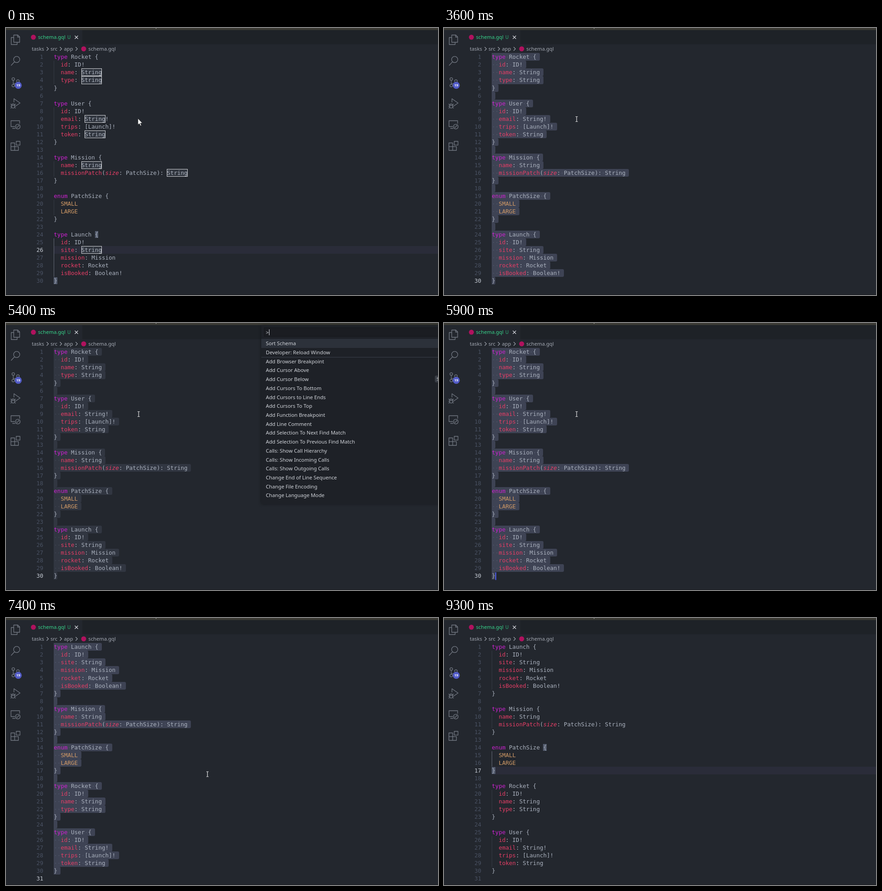
Animation of 951 by 589 pixels, one loop 9500 ms. Source, as an HTML page:

```html
<!DOCTYPE html>
<html lang="en">
<head>
<meta charset="utf-8">
<title>Sort schema</title>
<style>
  :root { --lh: 17.04px; --cw: 7.553px; --top: 55.4px; --left: 105.3px; }
  html, body { margin: 0; width: 100%; height: 100%; overflow: hidden; background: #23272e; }
  #stage { position: relative; width: 951px; height: 589px; overflow: hidden; background: #23272e; }
  #stage > svg { position: absolute; left: 0; top: 0; }
  svg text { font: 11.2px "Noto Sans", sans-serif; }
  .icons { fill: none; stroke: #737983; stroke-width: 1.3; stroke-linejoin: round; }
  .crumbs { fill: #a3a8b2; }
  .marks { fill: none; stroke: #a3a8b2; stroke-width: 1.1; }

  .doc { position: absolute; z-index: 0; left: var(--left); top: var(--top); width: 846px;
    font: 12.546px/var(--lh) "DejaVu Sans Mono", monospace; font-variant-ligatures: none;
    color: #abb2bf; white-space: pre; }
  .l { position: relative; height: var(--lh); }
  .n { position: absolute; left: -60px; width: 36.7px; text-align: right; color: #495162; }
  .l.on .n { color: #c3c8d1; }
  .l.on::before { content: ""; position: absolute; z-index: -2; inset: 0; background: #2a2c39; }
  .l.in::after { content: ""; position: absolute; z-index: -1; left: 0; top: 0; width: 1px;
    height: 100%; background: #363b45; }
  .blk.on .l.in::after { background: #646a76; }
  .t, .w { display: inline-block; height: var(--lh); vertical-align: top; }
  .t { padding-right: var(--cw); border-radius: 0 3px 3px 0; }
  .t.last { padding: 0; }
  .k { color: #cc22d0; }
  .f { color: #e63e66; }
  .c { color: #d19a66; }
  .s { color: transparent; }
  .blk.on .b { background: #50586a; box-shadow: inset 0 0 0 1px #5a6376; }
  .words .w { background: #31363f; box-shadow: inset 0 0 0 1px #d4d6da; }
  .sel .t { background: #3e4354; }
  .sel .s { color: #50566a; }
  .sel .l.on::before { display: none; }
  .dim .t { background: #313641; }
  .dim .s { color: #414753; }
  #caret { position: absolute; width: 2px; height: var(--lh); background: #4858ee; }

  #palette { position: absolute; left: 562px; top: 5px; width: 420px; height: 394px;
    background: #1e2127; box-shadow: 0 0 7px rgba(0,0,0,.4);
    font: 11.24px/19.72px "Noto Sans", sans-serif; color: #d2d5db; }
  #palette .input { position: absolute; left: 6px; top: 5px; right: 0; height: 20px;
    box-sizing: border-box; border: 1px solid #15171b; background: #1b1d22; padding-left: 3px; }
  #bar { position: absolute; left: 10px; top: 3px; width: 1px; height: 13px; background: #dfe2e8; }
  #palette .rows { position: absolute; top: 30.2px; left: 0; right: 0; }
  #palette .rows div { height: 19.72px; padding-left: 10px; white-space: nowrap; }
  #palette .rows div:first-child { background: #2c313a; }
  #palette .rows div:nth-child(3) { box-shadow: inset 0 1px #3b404a; }
  #palette .key { position: absolute; left: 382px; top: 111px; width: 30px; height: 15px; padding-left: 4px;
    background: #393d45; border-radius: 3px; font-size: 9.5px; line-height: 15px; }
</style>
</head>
<body>
<div id="stage">
  <svg width="951" height="589">
    <path fill="#1e2227" d="M168 4H951V36H168z"/>
    <path fill="#3b3b35" d="M0 0H951V4.5H0z"/>
    <path fill="#c8c8c0" d="M330 0h1.5l-1 1.5h-1z"/>
    <path fill="#191c20" d="M0 588H951V589H0z"/>

    <g class="icons">
      <path d="M17 15.5h9l4 4V31.500H17zM25.500 15.500V20H30M17 21H11.500V36.500H24.500V31.500"/>
      <path d="M18.800 74.500L11.200 82.800"/><circle cx="23.500" cy="69.500" r="6.800"/>
      <circle cx="16" cy="112.500" r="2.900"/><circle cx="16" cy="127" r="2.900"/><circle cx="26.300" cy="117" r="2.900"/>
      <path d="M16 115.500V124M26.300 120C26 123.500 19 121 16.500 124"/>
      <path d="M17.500 164V156L31 165.500L21.500 172"/>
      <path d="M12.500 170.500a3.200 3.200 0 0 1 6.400 0v3a3.200 3.200 0 0 1-6.400 0zM12.500 170.500h6.400M10 167.500l2.500 2M21.400 167.500l-2.500 2M9.800 172.500h2.700M18.900 172.500h2.700M10 177l2.700-2M21.400 177l-2.700-2"/>
      <path d="M19.500 217.500H11V204.500H30V211M14 221.500h6.500"/>
      <circle cx="26" cy="217.500" r="5.200"/><path d="M23.500 217l1.800 1.700-1.800 1.700M28.600 214.500l-1.800 1.700 1.800 1.700"/>
      <path d="M10.800 253.500h8.300V270H10.800zM10.800 261.700H27.400V270H19.100V261.700M22.500 250h8.300v8.300h-8.300z"/>
    </g>
    <circle cx="27" cy="126.500" r="7.700" fill="#525bc6"/>
    <text x="27" y="129.300" text-anchor="middle" fill="#fff" style="font-size:7.500px;font-weight:700">19</text>

    <circle cx="60.300" cy="20.300" r="5.500" fill="#b0125e"/>
    <text x="70.500" y="24.200" fill="#38d48b">schema.gql</text>
    <text x="135" y="24.200" fill="#2fb578" style="font-size:10px">U</text>
    <path d="M151.500 17l7 7M158.500 17l-7 7" stroke="#d7dae0" stroke-width="1.200"/>

    <g class="crumbs">
      <text x="56.800" y="50">tasks</text><text x="98" y="50">src</text>
      <text x="127.500" y="50">app</text><text x="181.300" y="50">schema.gql</text>
    </g>
    <path class="marks" d="M89.500 42l4 4-4 4M118.700 42l4 4-4 4M153.300 42l4 4-4 4"/>
    <circle cx="171" cy="46" r="5.500" fill="#b0125e"/>
  </svg>

  <div id="caret"></div>

  <div id="palette">
    <div class="input">&gt;<i id="bar"></i></div>
    <div class="rows"></div>
    <div class="key">Shift</div>
  </div>

  <svg width="951" height="589">
    <g id="mouse">
      <path id="arrow" d="M0 0V14.500l3.300-3 2.300 5.200 2.300-1-2.300-5h4.500z" fill="#f4f4f4" stroke="#15171a" stroke-width=".8"/>
      <path id="beam" d="M-2.500-5.500H-.7L0-5l.7-.5H2.500M0-5V5M-2.500 5.500H-.7L0 5l.7.5H2.500" fill="none" stroke="#e6e6e6" stroke-width="1.200"/>
    </g>
  </svg>
</div>

<script>
const LOOP = 9500, LH = 17.04, CW = 7.553, TOP = 55.4, LEFT = 105.3;
const $ = id => document.getElementById(id);
const stage = $('stage');

const blocks = [
  'type Rocket {|  id: ID!|  name: String|  type: String|}',
  'type User {|  id: ID!|  email: String!|  trips: [Launch]!|  token: String|}',
  'type Mission {|  name: String|  missionPatch(size: PatchSize): String|}',
  'enum PatchSize {|  SMALL|  LARGE|}',
  'type Launch {|  id: ID!|  site: String|  mission: Mission|  rocket: Rocket|  isBooked: Boolean!|}'
].map(b => b.split('|'));
const nameOf = block => block[0].split(' ')[1];
const sorted = [...blocks].sort((a, b) => nameOf(a) < nameOf(b) ? -1 : 1);

function paint(line) {
  const tag = (cls, s) => `<span@class="${cls}">${s}</span>`;
  return line
    .replace(/^(type|enum)|^( +)([A-Z]+)$|^( +)(\w+)/, (m, key, p1, value, p2, field) =>
      key ? tag('k', key) : value ? p1 + tag('c', value) : p2 + tag('f', field))
    .replace('(size', '(<i@class="f">size</i>')
    .replace('String', tag('w', 'String'))
    .replace(/[{}]/, s => tag('b', s))
    .replace(/ /g, tag('s', '·'))
    .replace(/@/g, ' ');
}

function makeDoc(list, trailing) {
  const doc = document.createElement('div');
  doc.className = 'doc';
  doc.rows = [];
  const addLine = (parent, text, last) => {
    const row = document.createElement('div');
    row.className = text[0] === ' ' ? 'l in' : 'l';
    doc.rows.push(row);
    row.innerHTML = `<span class="n">${doc.rows.length}</span>` +
      `<span class="t${last ? ' last' : ''}">${paint(text)}</span>`;
    parent.append(row);
  };
  list.forEach((block, i) => {
    const end = i === list.length - 1;
    const box = document.createElement('div');
    box.className = 'blk';
    block.forEach((text, j) => addLine(box, text, end && !trailing && j === block.length - 1));
    doc.append(box);
    if (!end || trailing) addLine(doc, '', end);
  });
  stage.insertBefore(doc, $('caret'));
  return doc;
}
const docs = [makeDoc(blocks, false), makeDoc(sorted, true)];

document.querySelector('.rows').innerHTML = [
  'Sort Schema', 'Developer: Reload Window', 'Add Browser Breakpoint', 'Add Cursor Above',
  'Add Cursor Below', 'Add Cursors To Bottom', 'Add Cursors to Line Ends', 'Add Cursors To Top',
  'Add Function Breakpoint', 'Add Line Comment', 'Add Selection To Next Find Match',
  'Add Selection To Previous Find Match', 'Calls: Show Call Hierarchy', 'Calls: Show Incoming Calls',
  'Calls: Show Outgoing Calls', 'Change End of Line Sequence', 'Change File Encoding',
  'Change Language Mode'
].map(s => `<div>${s}</div>`).join('');

const steps = [
  { at: 0, doc: 0, line: 26, col: 14, words: true },
  { at: 2800, doc: 0, line: 9, col: 16, words: true },
  { at: 2900, doc: 0, line: 9, col: 16 },
  { at: 3200, doc: 0, line: 30, col: 1, sel: true },
  { at: 4200, doc: 0, line: 30, col: 1, sel: true, open: true },
  { at: 5900, doc: 0, line: 30, col: 1, sel: true },
  { at: 6000, doc: 1, line: 31, col: 0, sel: true },
  { at: 7600, doc: 1, line: 17, col: 1 }
];
const caretOn = [[2700, 3600], [5900, 6400], [6900, 7400], [7600, 8100], [8600, 9100]];
const within = (t, [a, b]) => t >= a && t < b;
const show = (el, on) => { el.style.visibility = on ? 'visible' : 'hidden'; };

let current;
function apply(step) {
  if (step === current) return;
  current = step;
  docs.forEach((doc, i) => {
    show(doc, i === step.doc);
    doc.classList.toggle('sel', !!step.sel);
    doc.classList.toggle('dim', !!step.open);
    doc.classList.toggle('words', !!step.words);
    const active = doc.rows[step.line - 1];
    doc.rows.forEach(row => row.classList.toggle('on', row === active));
    doc.querySelectorAll('.blk').forEach(b =>
      b.classList.toggle('on', !step.sel && b.contains(active)));
  });
  $('palette').style.display = step.open ? 'block' : 'none';
  $('caret').style.left = LEFT + step.col * CW - .3 + 'px';
  $('caret').style.top = TOP + (step.line - 1) * LH + 'px';
}

// Pointer place, moving in steps of 100 ms; null once it has left
function pointer(t) {
  if (t < 400) return [290.3, 199.3];
  if (t < 7300) return [292, 201];
  if (t < 7400) return [372, 276];
  if (t < 8000) return [443.5, 344.5];
  if (t >= 8700) return null;
  const p = (Math.floor((t - 8000) / 100) + 1) / 8;
  const e = p * p * (3 - 2 * p);
  return [443.5 - 444 * e, 344.5 - 354 * e];
}

function render(t) {
  apply(steps.findLast(s => t >= s.at));
  show($('caret'), caretOn.some(span => within(t, span)));
  $('bar').style.opacity = within(t, [4800, 5400]) ? 0 : 1;
  const pos = pointer(t);
  show($('mouse'), pos);
  if (!pos) return;
  const beam = t >= 400 && pos[0] > LEFT && pos[1] > TOP;
  $('mouse').setAttribute('transform', `translate(${pos})`);
  $('beam').style.display = beam ? '' : 'none';
  $('arrow').style.display = beam ? 'none' : '';
}

const start = performance.now();
function frame() {
  render((performance.now() - start) % LOOP);
  requestAnimationFrame(frame);
}
frame();
</script>
</body>
</html>
```
